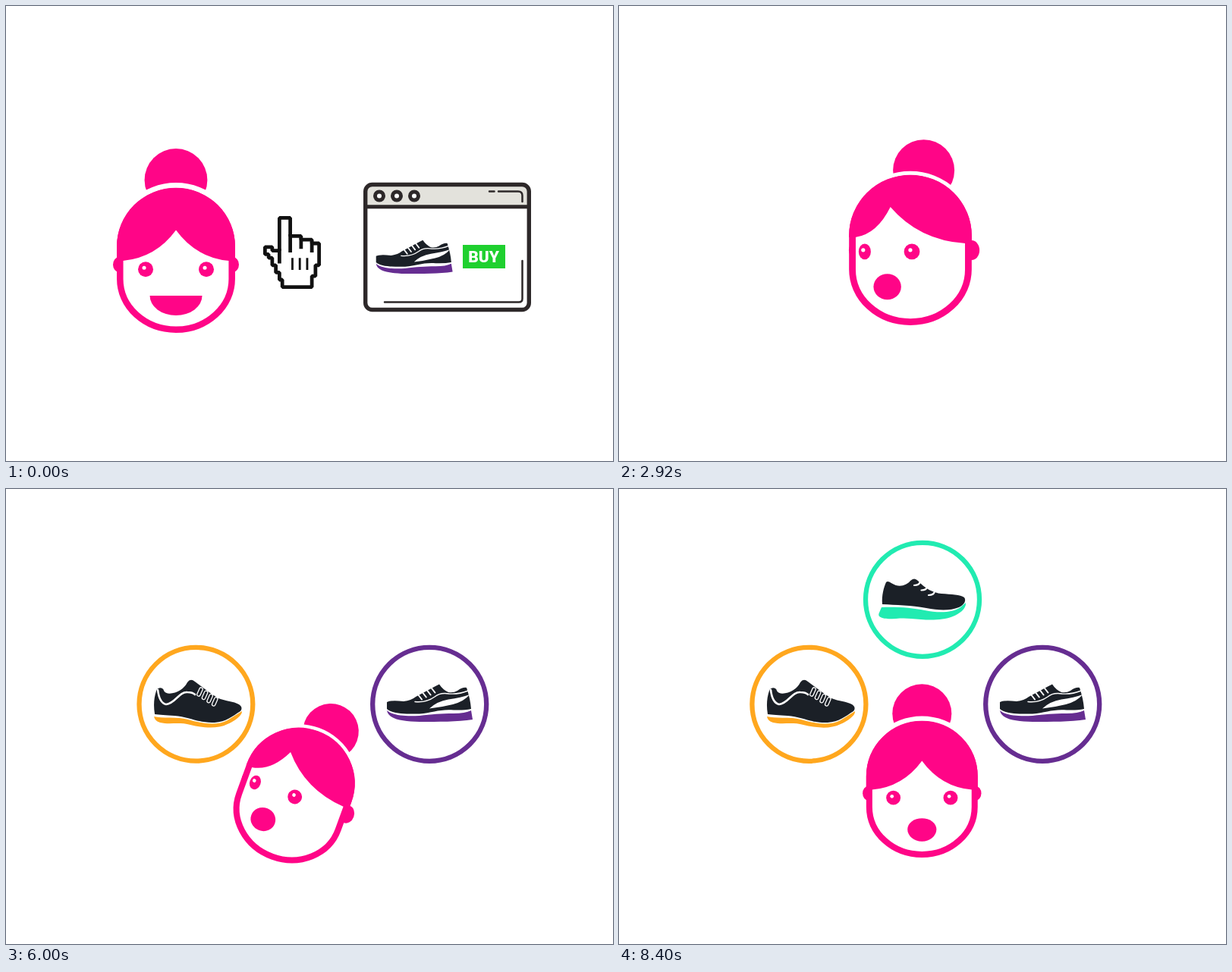
Animation of 800 by 600 pixels, one loop 8440 ms. Source, as an HTML page:

```html
<!DOCTYPE html>
<html lang="en">
<head>
<meta charset="utf-8">
<title>Shoe bubbles</title>
<style>
html, body { margin: 0; width: 100%; height: 100%; overflow: hidden; background: #fff; }
svg { display: block; width: 800px; height: 600px; }
text { font: 900 21px Roboto, "Open Sans", sans-serif; fill: #fff; text-anchor: middle; }
.line { fill: none; stroke-linecap: round; stroke-linejoin: round; }
.pink { fill: #ff0587; }
.dark { fill: #1b2027; }
.white { fill: #fff; }
</style>
</head>
<body>
<svg viewBox="0 0 800 600">
  <defs>
    <g id="shoe0">
      <path class="dark" d="M502 281Q507 278 524 280Q534 279 540 274L566 260L571 257.500Q576 265 583 268Q590 269 595 266Q602 261 607 262Q612 277 613 290Q604 292 590 291.500C572 290 562 295 545 296.500C525 297 508 296 502 290Z"/>
      <path class="white" d="M558 289.500Q568 280 583 277.500Q600 275 611 271Q604 280 589 284Q573 288 558 289.500Z"/>
      <g class="line" stroke="#fff" stroke-width="1.400">
        <path d="M539 280.500Q554 282 565 274Q572 268 584 270Q597 271 609 266"/>
        <path id="laces0" stroke-width="2"/>
      </g>
      <path fill="#662d91" d="M502 292C510 299 527 300 545 299C562 297 572 296 590 296Q605 296 613 292L615 304C595 307 570 307 545 307C522 306 504 304 502 292Z"/>
    </g>
    <g id="shoe1">
      <path class="dark" d="M196 297C194 285 195 275 198 266C200 261 207 261 208 266C211 272 222 270 230 265Q236 261 239 255Q243 249 249 254L257 260Q270 270 280 276C290 280 300 280 307 284Q313 288 309 293C298 300 290 307 275 308C255 309 243 301 222 299Q205 298 196 297Z"/>
      <g class="line" stroke="#fff">
        <path d="M200 265Q202 282 211 284C223 283 228 267 239 268Q246 268 249 271" stroke-width="2.600"/>
        <g id="laces1" stroke-width="1.300"></g>
      </g>
      <path fill="#ffa71e" d="M195 300C205 303 225 300 240 304C260 310 279 312 292 305L311 293C312 298 302 306 292 310C278 317 260 315 243 311C228 307 215 311 203 308Q196 306 195 300Z"/>
    </g>
    <g id="shoe2">
      <path class="dark" d="M347 152C346 140 349 130 352 123C355 120 359 125 365 127C373 129 380 126 384 121Q389 116 394 121C403 131 414 137 425 138C438 139 450 139 455 143C458 147 455 153 448 156C436 161 420 160 405 157C385 153 365 153 347 152Z"/>
      <path id="laces2" class="line" stroke="#fff" stroke-width="2.200"/>
      <path fill="#21ebb1" d="M346 156C362 155 385 156 403 160C422 164 440 163 450 156L457 150C458 158 448 165 440 168C425 174 405 173 385 171C370 169 355 173 347 170Q340 168 343 163Z"/>
    </g>
  </defs>

  <g id="head">
    <ellipse id="earL" class="pink"/><ellipse id="earR" class="pink"/>
    <circle id="bun" class="pink"/>
    <path id="gap" d="M-78 -18A78 77 0 0 1 78 -18" fill="none" stroke="#fff"/>
    <path d="M-73.700 -18V25A73.700 66.700 0 0 0 73.700 25V-18A73.700 73 0 0 0 -73.700 -18Z" fill="#fff" stroke="#ff0587" stroke-width="8.500"/>
    <path id="hair" class="pink"/>
    <g id="eyeL"></g><g id="eyeR"></g>
    <path id="mouth" class="pink"/>
  </g>

  <g id="shop">
    <rect x="473.700" y="235.500" width="215.600" height="165" rx="9" fill="#fff"/>
    <path d="M474 265V244Q474 235.500 483 235.500H680Q689 235.500 689 244V265Z" fill="#e3e2dc"/>
    <g fill="none" stroke="#2d2829" stroke-width="5">
      <rect x="473.700" y="235.500" width="215.600" height="165" rx="9" stroke-width="5.400"/>
      <path d="M473 264.800H690"/>
      <path class="line" d="M637 244.500H643.500M649 244.500H675Q680.500 244.500 680.500 250V258M680.500 336V386Q680.500 390.500 676 390.500H499" stroke-width="2.500"/>
      <g id="dots" fill="#fff"></g>
    </g>
    <use href="#shoe0" transform="translate(538 331) scale(.893) translate(-558.300 -282.300)"/>
    <rect x="602" y="315" width="56" height="31" fill="#1fd02f"/>
    <text x="629.500" y="338">BUY</text>
    <g id="hand" stroke="#111" stroke-linejoin="bevel">
      <path class="white" d="M4.500 .5H7.500V5.500H10.500V6.500H13.500V7.500H15.500V13.500H14.500V16.500H13.500V19.500H5.300V17.500H4.500V15.500H3.500V13.500H2.500V11.500H1.500V10.500H.5V8.500H2.500V9.500H4.500Z"/>
      <path d="M4.500 9v4M7.500 5v5M10.500 6v3M13.500 7v3"/>
      <path stroke-width="3.300" stroke-dasharray=".6 1.450" d="M7.800 13.150h4.800"/>
    </g>
  </g>

  <g id="rings"></g>
  <g id="bubble">
    <circle r="68.500" fill="currentColor"/>
    <path d="M22 -65A68.500 68.500 0 1 0 -9 68C22 38 32 -17 22 -65Z" fill="#fff" opacity=".13"/>
    <ellipse class="white" rx="7" ry="8.200" transform="translate(-43.500 -31) rotate(30)"/>
    <ellipse class="white" rx="4.500" ry="5.500" transform="translate(-51 -9) rotate(20)"/>
  </g>
</svg>
<script>
const LOOP = 8440;
const $ = id => document.getElementById(id);
const set = (el, attrs) => { for (const k in attrs) el.setAttribute(k, attrs[k]); };
const show = (el, on) => { el.style.display = on ? '' : 'none'; };
const mix = (a, b, k) => a + (b - a) * k;
const ease = k => k * k * (3 - 2 * k);
const part = (t, a, b) => Math.min(1, Math.max(0, (t - a) / (b - a)));
const glide = (t, a, b) => ease(part(t, a, b));
const elastic = k => k <= 0 ? 0 : k >= 1 ? 1 : 1 + 2 ** (-10 * k) * Math.sin((k - .075) * 2 * Math.PI / .3);
const repeat = (n, make) => Array.from({ length: n }, (_, i) => make(i)).join('');

// Each bubble is blown at the mouth, flung to its place and popped
const bubbles = [[558.2, 283.8, '#662d91'], [250.4, 283.8, '#ffa71e'], [400, 145.8, '#21ebb1']].map(([x, y, color], i) => {
  const land = 4800 + 930 * i;
  return { x, y, color, land, blow: land - 220, fly: land - 110, pop: land + 40, mouthX: i ? 428 : 372, mouthY: 455 };
});

const home = { x: 224, y: 335, size: 1, tilt: 0, turn: 0, up: 0, round: 0 };
const center = { ...home, x: 384, y: 321.5, size: 1.037 };
const awed = { ...center, round: 1 };
const low = { ...awed, x: 399.3, y: 395.6, size: .942 };
const left = { ...low, x: 380.5, y: 403.6, tilt: 20, turn: -1, up: 1 };
const right = { ...low, x: 400, y: 408, tilt: -9, turn: .82, up: 1 };
const above = { ...low, y: 425, up: 1.2 };

const poses = [
  [0, home], [1480, home], [1520, { ...home, x: 216 }], [1760, center], [1800, center],
  [2160, { ...awed, turn: 1, up: 1 }], [2320, { ...awed, turn: 1, up: 1 }],
  [2800, { ...awed, turn: -.97, up: 1 }], [3240, { ...awed, turn: -1, up: 1 }], [3440, { ...awed, turn: -1, up: 1 }],
  [3840, { ...awed, up: -1 }], [4280, { ...awed, up: -.8 }], [4400, low],
  ...bubbles.flatMap(({ blow, fly, land }, i) => {
    const [from, to] = i ? [right, left] : [left, right];
    return [[blow, from], [fly, from], [land, to], [land + 430, to]];
  }),
  [7300, above], [7960, above], [8400, { ...low, round: .93 }], [LOOP, low]
];

function poseAt(t) {
  const i = poses.findIndex(([end]) => t < end);
  const [a, from] = poses[i - 1], [b, to] = poses[i];
  const k = glide(t, a, b), p = {};
  for (const key in home) p[key] = mix(from[key], to[key], k);
  p.turn += .3 * Math.sin(Math.PI * part(t, 0, 880));
  p.y -= 65 * Math.sin(Math.PI * part(t, 1520, 1760));
  p.open = mix(.1, 1, glide(Math.abs(t - 1520), 0, 130));
  p.side = Math.sin(p.turn * Math.PI / 2);
  return p;
}

function drawEye(el, side, { turn, side: swing, up, open }) {
  const far = Math.max(0, side * turn), shut = 1 - open;
  const [ball, , top, bottom] = el.children;
  set(el, { transform: `translate(${40 * side + (far ? 18 * swing : 39 * turn)} ${12.3 - 10 * up})` });
  set(ball, { rx: 10 - 2.3 * far });
  set(top, { height: shut && 1 + 9 * shut });
  set(bottom, { y: 10 - 12 * shut, height: shut && 1 + 12 * shut });
}

function drawEar(el, side, { turn, up }) {
  const near = Math.max(0, -turn * side), far = Math.max(0, turn * side);
  set(el, { cx: side * (75 + 3 * near - 5 * far * far), cy: 6 - 5.5 * up, rx: 8 + 2 * near, ry: 10 + 2.5 * near });
}

function drawHair({ turn, up }) {
  const x = 26 * turn, y = -39.5 - 15 * up;
  const side = s => ({ end: 1 - 13 * up - 4 * s * turn, bend: mix(70 * s, x, .62) });
  const l = side(-1), r = side(1);
  set($('hair'), { d: `M-78 ${l.end}V-18A78 77 0 0 1 78 -18V${r.end}H70
    Q${r.bend} ${r.end - 4} ${x} ${y}Q${l.bend} ${l.end - 4} -70 ${l.end}Z` });
}

function drawMouth({ turn, up, round }) {
  const w = mix(34.5, 19.2 - 1.7 * Math.abs(turn), round);
  const x = 30 * turn, y = mix(47, 57, round) - 10 * up;
  set($('mouth'), { d: `M${x - w} ${y}A${w} ${16.4 * round} 0 0 1 ${x + w} ${y}
    A${w} ${mix(26, 16.4, round)} 0 0 1 ${x - w} ${y}Z` });
}

function drawHead(t) {
  const p = poseAt(t), amount = Math.abs(p.turn);
  set($('head'), { transform: `translate(${p.x} ${p.y}) rotate(${p.tilt}) scale(${p.size})` });
  set($('bun'), { cx: -17 * p.side, cy: -105.5 + 4.5 * p.up, r: 41.4 - 2.4 * amount });
  set($('gap'), { 'stroke-width': 14 - 4 * amount });
  drawEar($('earL'), -1, p);
  drawEar($('earR'), 1, p);
  drawHair(p);
  drawEye($('eyeL'), -1, p);
  drawEye($('eyeR'), 1, p);
  drawMouth(p);
}

function drawShop(t) {
  show($('shop'), t < 1720);
  const s = 1 - glide(t, 1480, 1720);
  set($('shop'), { transform: `translate(581.5 318) scale(${s}) translate(-581.5 -318)` });
  const k = glide(t, 0, 880), press = 1 - .1 * Math.sin(Math.PI * part(t, 920, 1100));
  const x = mix(339, 597, k) + 28 * (1 - press);
  const y = mix(277, 325, k) - mix(155, 85, k) * Math.sin(2 * Math.PI * k);
  set($('hand'), { transform: `translate(${x} ${y}) scale(${4.75 * press} ${4.8 * press})` });
}

function drawBubbles(t) {
  bubbles.forEach((b, i) => {
    const size = elastic(part(t, b.pop, b.pop + 270));
    show($('ring' + i), t > b.pop);
    set($('ring' + i), { transform: `translate(${b.x} ${b.y}) scale(${Math.max(0, size)})` });
  });
  const b = bubbles.find(b => t >= b.blow && t <= b.pop);
  show($('bubble'), b);
  if (!b) return;
  const k = glide(t, b.fly, b.land);
  const size = mix(1.38 * glide(t, b.blow, b.fly), 1, k);
  $('bubble').style.color = b.color;
  set($('bubble'), { transform: `translate(${mix(b.mouthX, b.x, k)} ${mix(b.mouthY, b.y, k)}) scale(${size})` });
}

function build() {
  $('rings').innerHTML = bubbles.map((b, i) => `<g id="ring${i}">
    <circle r="75" fill="#fff" stroke="${b.color}" stroke-width="6.3"/>
    <use href="#shoe${i}" x="${-b.x}" y="${-b.y}"/></g>`).join('');
  $('dots').innerHTML = repeat(3, i => `<circle cx="${492 + 23 * i}" cy="250.5" r="5.5"/>`);
  set($('laces0'), { d: repeat(4, i => `M${543 + 5.8 * i} ${271 - 3 * i}l5 6.500`) });
  $('laces1').innerHTML = repeat(4, i =>
    `<rect class="dark" x="-2.2" y="-6" width="4.4" height="12" rx="2.2" transform="translate(${255.5 + 6.6 * i} ${267.5 + 4.3 * i}) rotate(24)"/>`);
  set($('laces2'), { d: repeat(3, i => `M${389 + 9.5 * i} ${127 + 6.5 * i}q7 0 8 -5`) });
  for (const id of ['eyeL', 'eyeR']) {
    $(id).innerHTML = `<ellipse class="pink" ry="10"/><circle class="white" cx="-2" cy="-2" r="2.5"/>
      <rect class="white" x="-11" y="-11" width="22"/><rect class="white" x="-11" width="22"/>`;
  }
}

build();
const start = performance.now();
function frame() {
  const t = (performance.now() - start) % LOOP;
  drawHead(t);
  drawShop(t);
  drawBubbles(t);
  requestAnimationFrame(frame);
}
frame();
</script>
</body>
</html>
```
